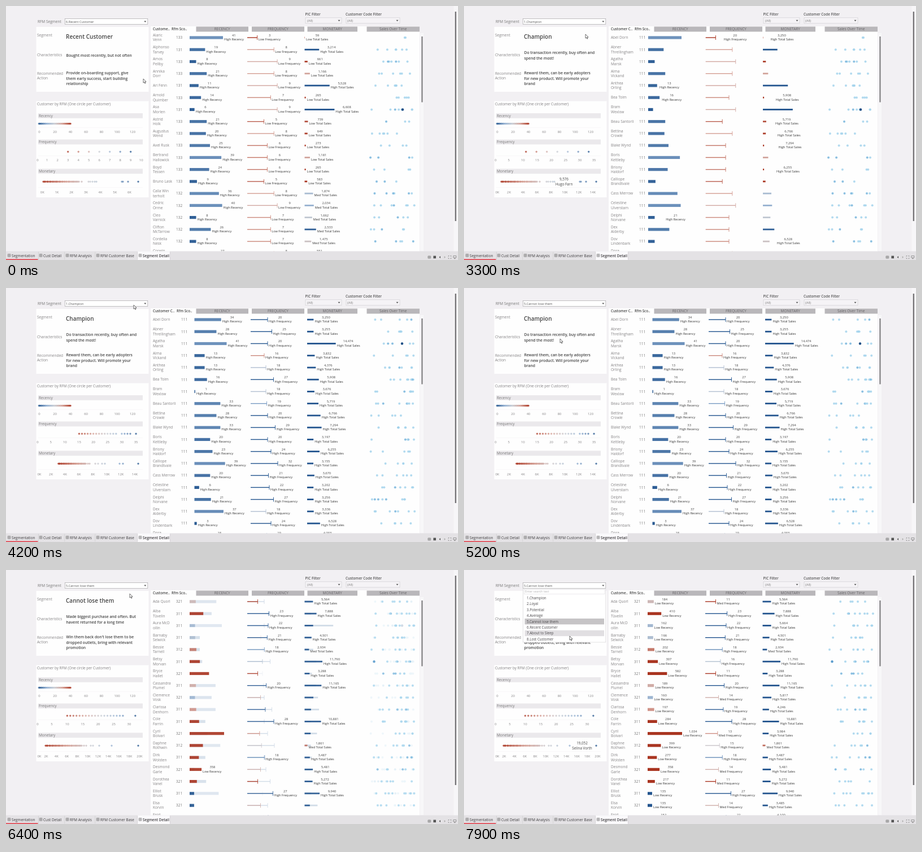
An HTML page for the animation above (8000 ms loop, 800x450 px).

```html
<!DOCTYPE html>
<html lang="en">
<head>
<meta charset="utf-8">
<title>Segment Detail</title>
<style>
html, body { margin: 0; width: 100%; height: 100%; overflow: hidden; background: #f2f0f3; }
svg { display: block; width: 100vw; height: 100vh; font-family: "Open Sans", "Noto Sans", sans-serif; }
</style>
</head>
<body>
<svg id="stage" viewBox="0 0 800 450"></svg>
<script>
const LOOP = 8000, STEP = 100;
const OPTIONS = ['Champion', 'Loyal', 'Potential', 'Average', 'Cannot lose them',
  'Recent Customer', 'About to Sleep', 'Lost Customer'];

const SEGMENTS = [
  {
    option: 5, scoreX: 301, headX: 293, head: 'Custome..',
    traits: ['Bought most recently, but not often'],
    action: ['Provide on-boarding support, give', 'them early success, start building', 'relationship'],
    names: ['Alaric/Venn', 'Alphonso/Tarvey', 'Amos/Pellby', 'Annika/Dorr', 'Ari Fenn', 'Arnold/Quimber',
      'Asa/Morlen', 'Astrid/Holk', 'Augustus/Wend', 'Axel Rusk', 'Bertrand/Hallowick', 'Boyd/Tessen',
      'Bruno Lask', 'Calla Win/terholt', 'Cedric/Orme', 'Cleo/Varnick', 'Clifton/McTarrow', 'Cordelia/Nesk', 'Corwin/Bly'],
    rec: [41, 19, 8, 21, 11, 14, 6, 21, 20, 25, 39, 24, 9, 36, 40, 8, 26, 8, 27],
    freq: [3, 8, 9, 8, 9, 7, 9, 5, 8, 6, 6, 6, 5, 8, 9, 7, 7, 7, 8],
    mon: [59, 3214, 661, 1166, 5528, 265, 6608, 739, 649, 273, 1181, 265, 583, 1874, 2034, 1662, 2533, 1475, 551],
    origin: [325, 427, 528.5], scale: [1.44, 5.9, .008],
    tone: [v => 1 - .35 * v / 41, v => (v - 13) / 10, v => (v - 1600) / 1000],
    count: f => Math.max(2, Math.min(7, f - 2)), star: [6, 702, '#1d4e85'],
    freqAxis: [54.2, 18.5, 1, 10], monAxis: [64.3, 25.7, 1, 6],
    freqDots: [3, 9], extra: [], dense: [65, 130],
    tail: [134, 146, 149, 153, 157, 160, 205, 207, 216, 234]
  },
  {
    option: 0, scoreX: 310, headX: 302, head: 'Customer C..',
    traits: ['Do transaction recently, buy often and', 'spend the most!'],
    action: ['Reward them, can be early adopters', 'for new product. Will promote your', 'brand'],
    names: ['Abel Dorn', 'Abner/Threllingham', 'Agatha/Marsk', 'Alma/Vickand', 'Anthea/Orling', 'Bea Tolm',
      'Bram/Wexlow', 'Beau Santorli', 'Bettina/Crowle', 'Blake Wynd', 'Boris/Kettleby', 'Briony/Haldorf',
      'Calliope/Brandtvale', 'Cass Merrow', 'Celestine/Ulverstam', 'Delphi/Norvane', 'Dex/Alderby', 'Dov/Lindenbark', 'Dora/Pell'],
    rec: [34, 28, 41, 13, 13, 16, 1, 33, 28, 33, 20, 23, 39, 20, 6, 21, 37, 3, 18],
    freq: [20, 25, 20, 16, 18, 27, 18, 19, 20, 29, 20, 24, 32, 21, 22, 27, 18, 24, 19],
    mon: [3250, 3255, 14474, 3832, 4376, 5908, 3676, 5719, 6766, 7294, 3197, 6255, 3155, 3670, 3202, 3256, 3336, 6528, 4003],
    origin: [333.5, 433, 533], scale: [1.39, 1.5, .0035],
    tone: [v => 1 - .35 * v / 41, v => (v - 17.5) / 2.5, v => (v - 1600) / 1000],
    count: f => 5 + f % 4, star: [2, 701, '#1d4e85'],
    freqAxis: [54, 5.03, 5, 35], monAxis: [54.8, 12.37, 2, 14],
    freqDots: [15, 28], extra: [30, 31, 32, 33, 35], dense: [92, 142],
    tail: [145, 148, 158, 163, 170, 175, 201, 207, 234],
    start: 3100, peak: ['9,576', 'Hugo Farn', 177],
    keep: [[4, 5, 15], [0], [0, 5, 7, 8, 9, 11, 17]]
  },
  {
    option: 4, scoreX: 301, headX: 293, head: 'Custome..',
    traits: ['Made biggest purchase and often. But', 'havent returned for a long time'],
    action: ["Win them back don't lose them to be", 'dropped outlets, bring with relevant', 'promotion'],
    names: ['Ada Quorl', 'Alba/Tüvelin', 'Aura McD/ollin', 'Barnaby/Selwick', 'Bessie/Tarnell', 'Betsy/Morvan',
      'Bryce/Hallet', 'Cassandra/Plumel', 'Clemence/Vosk', 'Clarissa/Denhorn', 'Cole/Farrin', 'Cyril/Bolvari',
      'Daphne/Rothwin', 'Dirk/Wolsten', 'Desmond/Garle', 'Dorothea/Vanel', 'Elliot/Brusk', 'Elsa/Korvin', 'Enid/Tarl'],
    rec: [184, 410, 162, 166, 202, 307, 582, 189, 160, 197, 284, 1034, 399, 277, 358, 217, 135, 135, 152],
    freq: [11, 23, 22, 21, 18, 16, 11, 20, 14, 19, 28, 13, 15, 18, 14, 11, 27, 14, 22],
    mon: [5564, 7888, 5664, 4501, 2934, 11790, 3288, 11165, 5817, 4246, 10881, 3984, 1861, 3487, 5481, 5272, 9940, 3485, 4100],
    origin: [325, 427, 528.5], scale: [.059, 1.68, .00267],
    tone: [v => (175 - v) / 40, v => (v - 15.3) / 4, v => (v - 2300) / 600],
    count: f => 2 + Math.round(f / 4), star: [5, 651.5, '#5b9ccd'],
    freqAxis: [53.5, 5.48, 5, 30], monAxis: [52.5, 9.2, 2, 20],
    freqDots: [10, 28], extra: [32], dense: [69, 135],
    tail: [138, 142, 150, 154, 165, 187, 234],
    start: 5800, peak: ['19,052', 'Selina Vorth', 209],
    keep: [[14], [1, 2, 3, 4, 7, 10, 13, 16], [0, 1, 3, 4, 5, 6, 7, 10, 12, 13, 14, 15, 16]]
  }
];

// Pointer tip: time, x, y
const POINTER = [
  [0, 243, 129], [300, 410, 154], [500, 468, 125], [700, 400, 62], [900, 328, 72], [1000, 300, 56],
  [1400, 226, 30], [2000, 226, 30], [2300, 150, 48], [3100, 150, 48], [3300, 215, 50], [3900, 326, 195],
  [4200, 226, 30], [4500, 226, 30], [5000, 170, 90], [5800, 170, 90], [6000, 213, 90], [6400, 219, 42],
  [6700, 226, 30], [7100, 226, 30], [7700, 186, 115], [7800, 186, 115], [7900, 187, 117], [8000, 187, 117]
];
const OPEN = [[1600, 2300], [4600, 5100], [6800, 8000]];

const clamp = (v, a = 0, b = 1) => Math.min(b, Math.max(a, v));
const mix = (a, b, p) => a + (b - a) * p;
const noise = s => { const x = Math.sin(s * 127.1 + 11.7) * 43758.5453; return x - Math.floor(x); };
const each = (n, fn) => Array.from({ length: n }, (_, i) => fn(i)).join('');

const rect = (x, y, w, h, fill, more = '') =>
  `<rect x="${x}" y="${y}" width="${w}" height="${h}" fill="${fill}" ${more}/>`;
const text = (x, y, s, size, fill, more = '') =>
  `<text x="${x}" y="${y}" font-size="${size}" fill="${fill}" ${more}>${s}</text>`;
const dot = (x, y, r, fill, more = '') => `<circle cx="${x}" cy="${y}" r="${r}" fill="${fill}" ${more}/>`;
const fade = (o, s) => o > 0 ? `<g opacity="${o}">${s}</g>` : '';
const MID = 'text-anchor="middle"', BOLD = 'font-weight="600"';

// Diverging ramp, -1 red to 1 blue
const RAMP = [[169, 52, 32], [212, 158, 147], [199, 203, 210], [143, 173, 208], [34, 84, 142]];
function tone(u) {
  const p = clamp(u * 2 + 2, 0, 3.999), i = Math.floor(p);
  return `rgb(${RAMP[i].map((c, k) => Math.round(mix(c, RAMP[i + 1][k], p - i)))})`;
}

const rowY = i => 56 + 21.24 * i;
const levels = [v => v > 100 ? 3 : 1, v => v < 10 ? 3 : v < 15 ? 2 : 1, v => v < 1400 ? 3 : v < 3000 ? 2 : 1];
const LEVEL = ['', 'High', 'Med', 'Low'], METRIC = ['Recency', 'Frequency', 'Total Sales'];
const HALF = [17.3, 20, 20];
const columns = seg => [seg.rec, seg.freq, seg.mon];

function bars(seg, origin, inset) {
  return columns(seg).map((list, c) => list.map((v, i) => {
    const y = rowY(i), gap = c && inset ? 3 : 0, x = origin[c] + gap;
    const w = v * seg.scale[c], fill = tone(seg.tone[c](v));
    const lead = gap ? rect(origin[c] - .7, y - .8, 1.5, 1.6, '#2b5b92') : '';
    if (c === 0) return rect(x, y - 2.6, w, 5.2, fill);
    if (c === 1) return lead + rect(x, y - .7, w, 1.4, fill) + rect(x + w - .45, y - 4, .9, 8, fill);
    return lead + rect(x, y - 1.4, w, 2.8, fill);
  }).join('')).join('');
}

function labels(seg, origin, keep) {
  return columns(seg).map((list, c) => list.map((v, i) => {
    if (keep && !keep[c].includes(i)) return '';
    const x = origin[c] + v * seg.scale[c] + 2, y = rowY(i);
    const half = HALF[c];
    return text(x + half, y - 2, v.toLocaleString('en-US'), 5.8, '#444', MID) +
      text(x, y + 5.3, LEVEL[levels[c](v)] + ' ' + METRIC[c], 5.6, '#333');
  }).join('')).join('');
}

function sales(seg, id) {
  const [starRow, starX, starFill] = seg.star;
  return seg.freq.map((f, i) => each(seg.count(f), k => {
    const s = id * 400 + i * 17 + k;
    const x = 640 + 84 * Math.pow(noise(s), .65);
    return dot(x, rowY(i), 2, noise(s + .5) > .85 ? '#78b5dc' : '#a5d3ec', 'opacity=".85"');
  })).join('') + dot(starX, rowY(starRow), 2.2, starFill);
}

function names(seg) {
  return seg.names.map((n, i) => {
    const [a, b] = n.split('/'), y = rowY(i);
    const score = columns(seg).map((list, c) => levels[c](list[i])).join('');
    return text(260, b ? y - 2 : y + 2.2, a, 6.5, '#858385') + (b ? text(260, y + 6.4, b, 6.5, '#858385') : '') +
      text(seg.scoreX, y + 2.3, score, 6.5, '#777');
  }).join('') +
    text(260, 43, seg.head, 6.2, '#444', BOLD) + text(seg.headX, 43, 'Rfm Sco..', 6.2, '#444', BOLD);
}

const ring = (x, y, u) => dot(x, y, 1.25, tone(u), `fill-opacity=".65" stroke="${tone(u)}" stroke-width=".6"`);

function strips(seg, showRecency) {
  const [fx, fs] = seg.freqAxis, [lo, hi] = seg.freqDots;
  const freq = Array.from({ length: hi - lo + 1 }, (_, i) => lo + i).concat(seg.extra);
  const top = freq[freq.length - 1];
  const [a, b] = seg.dense;
  const money = Array.from({ length: 42 }, (_, i) => mix(a, b, clamp((i + noise(i) * .9) / 42))).concat(seg.tail);
  return (showRecency ? each(42, i => ring(58.4 + i * 1.36, 208.5, 1 - i / 20.5)) : '') +
    freq.map(v => ring(fx + fs * v, 258.2, 2 * (v - lo) / (top - lo) - 1)).join('') +
    money.map(x => ring(x, 311.2, 2 * (x - a) / (234 - a) - 1)).join('');
}

function axis([x0, px, step, max], y, unit, minX) {
  return each(Math.floor(max / step) + 1, i =>
    text(Math.max(minX, x0 + px * step * i), y, i * step + unit, 5.9, '#868486', MID));
}

function card(seg) {
  const lines = (list, y) => list.map((s, i) => text(106.5, y + i * 9.5, s, 6.75, '#444', BOLD)).join('');
  return text(106, 57.6, OPTIONS[seg.option], 10, '#444', BOLD) +
    lines(seg.traits, seg.traits.length > 1 ? 85 : 89.8) + lines(seg.action, 121.2) +
    axis(seg.freqAxis, 275, '', 56) + axis(seg.monAxis, 332, 'K', 59);
}

const arrow = (x, y) => `<path d="M${x - 2} ${y - 1}h4l-2 2.4z" fill="#555"/>`;
const combo = (x, y, w, fill, stroke) =>
  rect(x, y, w, 10, fill, `stroke="${stroke}" stroke-width=".7"`) + arrow(x + w - 4.5, y + 5);

function backdrop() {
  const cap = (x, w, s) => rect(x, 36.5, w, 9, '#b9b7ba') + text(x + w / 2, 43.4, s, 6.5, '#69676a', MID);
  const band = (y, s) => rect(57, y, 185, 8.8, '#ebe9ec') + text(58, y + 6.7, s, 6.5, '#777');
  return rect(0, 0, 800, 450, '#f2f0f3') +
    rect(53.5, 37, 199, 115, '#fefefe') + rect(53.5, 168.5, 199, 170.5, '#fefefe') + rect(256, 36, 476, 399, '#fefefe') +
    rect(733, 48, 6, 386, '#f8f7f9') + rect(735.2, 54, 2.5, 116.5, '#8c8a8d') +
    rect(792.5, 0, 7.5, 435, '#f7f6f8') + rect(794.6, 10, 2.4, 371, '#777578') +
    text(56, 30, 'RFM Segment', 6.5, '#777') +
    text(529.5, 17, 'PIC Filter', 6.3, '#555', BOLD) + text(601, 17, 'Customer Code Filter', 6.3, '#555', BOLD) +
    combo(530, 20.8, 64, '#f5f3f6', '#d2d0d3') + combo(602, 20.8, 95, '#f5f3f6', '#d2d0d3') +
    text(533, 28, '(All)', 5.8, '#777') + text(604, 28, '(All)', 5.8, '#777') +
    text(55, 54.2, 'Segment', 6.5, '#858385') + text(55, 89, 'Characteristics', 6.5, '#858385') +
    text(55, 122, 'Recommended', 6.5, '#858385') + text(55, 130.3, 'Action', 6.5, '#858385') +
    text(55, 175.6, 'Customer by RFM (One circle per Customer)', 6.4, '#807e80') +
    band(190, 'Recency') + band(236.5, 'Frequency') + band(288.4, 'Monetary') +
    [215, 265, 321].map(y => rect(57, y, 185, .4, '#eceaed')).join('') +
    axis([59, 1.375, 20, 120], 224.8, '', 59) +
    cap(336.5, 92.5, 'RECENCY') + cap(435, 93, 'FREQUENCY') + cap(533.5, 88.5, 'MONETARY') + cap(638.5, 93.5, 'Sales Over Time');
}

function tabs() {
  const list = [[10, 'Segmentation'], [66, 'Cust Detail'], [113, 'RFM Analysis'], [167, 'RFM Customer Base'], [242, 'Segment Detail']];
  const line = 'fill="none" stroke="#777" stroke-width=".7"';
  return rect(0, 434.5, 800, 15.5, '#e4e2e5') + rect(233, 434.5, 57, 15.5, '#faf9fb') +
    rect(0, 448.2, 56.5, 1.8, '#e0525c') +
    [57, 103.5, 157.5, 232.5, 290].map(x => rect(x, 435.5, .6, 14, '#cbc9cc')).join('') +
    list.map(([x, s], i) => `<path d="M${x - 6.7} 439.6h4.6v4.6h-4.6zM${x - 4.4} 439.6v4.6M${x - 6.7} 441.9h4.6" ${line}/>` +
      text(x, 444.6, s, 6.4, '#3d3b3e', i === 4 ? BOLD : '')).join('') +
    `<path d="M747 443h4.6v4h-4.6zM747 445h4.6M749.3 443v4" ${line}/>` + rect(756.4, 442.6, 4.6, 4.6, '#555') +
    `<path d="M769 443v4l-2.4-2z" fill="#555"/><path d="M775.6 443v4l2.4-2z" fill="#aaa"/>` +
    `<path d="M783 444v-1.4h1.4M786.4 442.6h1.4v1.4M787.8 446v1.4h-1.4M784.4 447.4h-1.4v-1.4M791.8 442.6h5v3.4h-5zM794.3 446v1.6M793 447.6h2.6" ${line}/>`;
}

function menu(t, selected, [px, py]) {
  const hover = px > 107 && px < 248 ? Math.floor((py - 44.4) / 10.4) : -1;
  return rect(104.3, 33, 146.5, 95, '#fff', 'stroke="#cfcdd0" stroke-width=".6"') +
    rect(106.5, 34.6, 142.5, 8.2, '#fff', 'stroke="#d8d6d9" stroke-width=".5"') +
    text(108, 40.4, 'Enter search text', 5.4, '#b3b1b4') + (t < 2000 ? rect(107.6, 35.4, .7, 6.6, '#444') : '') +
    OPTIONS.map((s, i) => {
      const y = 44.4 + 10.4 * i, fill = i === selected ? '#c6c4c6' : i === hover ? '#e1dfe2' : '';
      return (fill ? rect(107.5, y, 140.5, i === 7 ? 10.2 : 10.4, fill) : '') + text(111, y + 7.6, `${i + 1}.${s}`, 6.2, '#4a484b');
    }).join('');
}

function pointerAt(t) {
  const i = Math.max(1, POINTER.findIndex(k => k[0] > t));
  const [t0, x0, y0] = POINTER[i - 1], [t1, x1, y1] = POINTER[i];
  const p = (t - t0) / (t1 - t0);
  return [mix(x0, x1, p), mix(y0, y1, p)];
}

const BACK = backdrop(), TABS = tabs();

function scene(t) {
  const id = t < 3100 ? 0 : t < 5800 ? 1 : 2, seg = SEGMENTS[id], old = SEGMENTS[id - 1];
  const dt = id ? t - seg.start : 9999, busy = dt < 800;
  const gone = clamp(1 - (dt - 300) / 375), shown = clamp((dt - 300) / 330);
  const shift = dt < 300 ? dt / 1800 : clamp(.17 + (dt - 300) / 240);
  const origin = seg.origin.map((x, c) => busy ? mix(old.origin[c], x, shift) : x);
  const early = busy && dt <= 300;
  const peakOn = id === 1 ? dt >= 100 && dt < 600 : id === 2 && dt >= 700;

  let s = BACK + names(seg) + card(seg);
  if (busy) s += fade(gone, bars(old, origin, id === 2 && early && dt >= 100) + sales(old, id - 1));
  s += fade(shown, bars(seg, origin) + sales(seg, id));
  s += busy ? labels(seg, origin, seg.keep) : labels(seg, origin);
  s += strips(early ? old : seg, id < 2 || busy);
  if (peakOn) {
    const [v, who, x] = seg.peak;
    s += text(x, 309, v, 6.3, '#444', MID) + text(x, 318, who, 6.3, '#444', MID);
  }

  const choice = t < 2300 ? 5 : t < 5100 ? 0 : 4, tip = pointerAt(t);
  s += combo(104.3, 22.6, 146.5, '#fff', '#a9a7aa') + text(106, 29.8, `${choice + 1}.${OPTIONS[choice]}`, 5.6, '#555');
  if (OPEN.some(([a, b]) => t >= a && t < b)) s += menu(t, choice, tip);
  s += TABS + `<path transform="translate(${tip})" d="M0 0v7.2l1.7-1.5 1.1 2.5 1.2-.5-1.1-2.5h2.2z" fill="#fff" stroke="#333" stroke-width=".7"/>`;
  return s;
}

const stage = document.getElementById('stage');
let last = -1;
function tick(now) {
  const t = Math.floor((now % LOOP) / STEP) * STEP;
  if (t !== last) { stage.innerHTML = scene(t); last = t; }
  requestAnimationFrame(tick);
}
tick(0);
</script>
</body>
</html>
```
